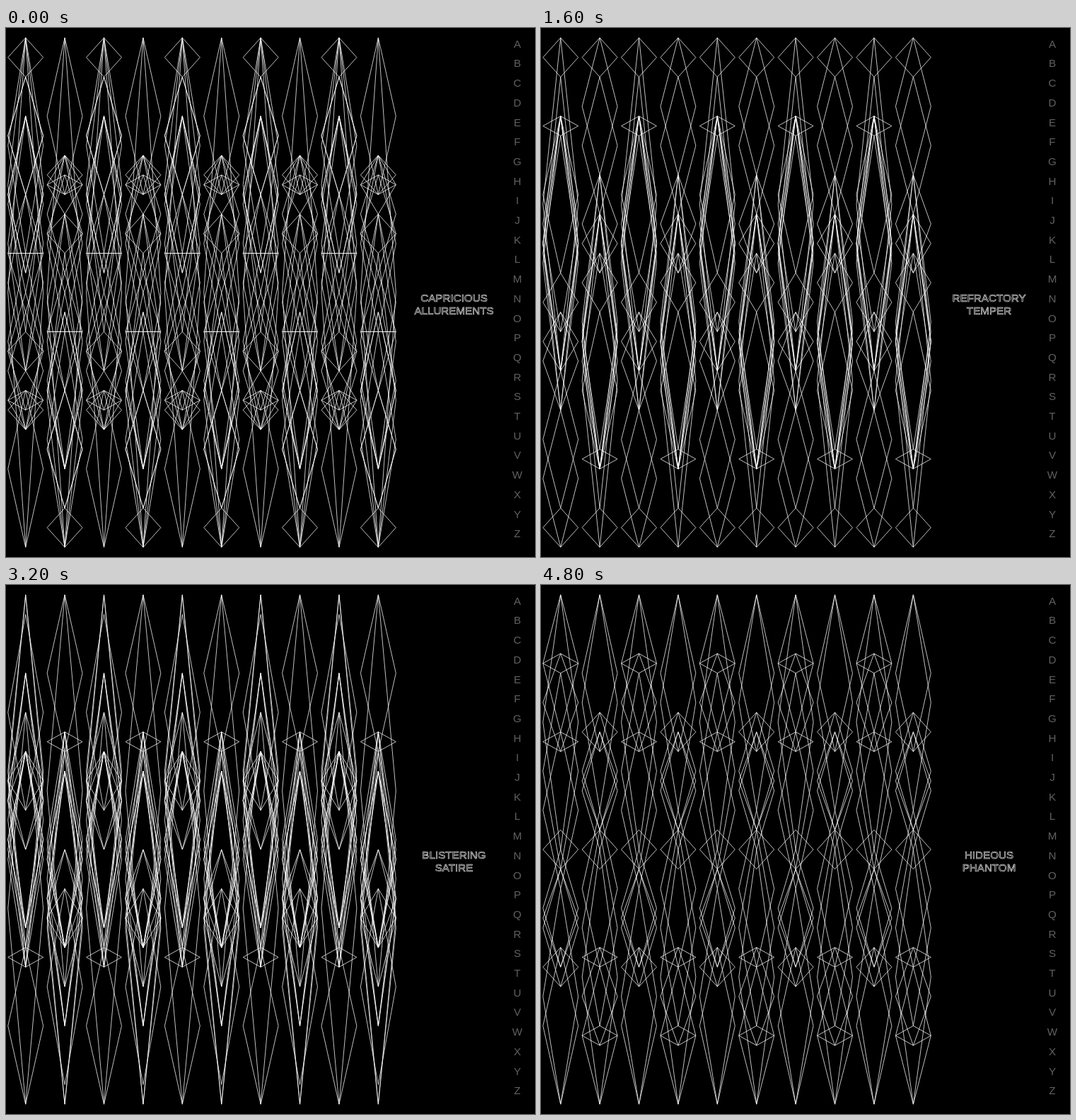
These frames come from a looping animation (748x748 px, 5.6 s). An HTML page with a canvas:

```html
<!DOCTYPE html>
<html lang="en">
<head>
<meta charset="utf-8">
<style>
  html, body { margin: 0; height: 100%; overflow: hidden; background: #000; }
  canvas { display: block; }
</style>
</head>
<body>
<canvas id="stage" width="748" height="748"></canvas>
<script>
const ctx = document.getElementById('stage').getContext('2d');
const PHRASES = [
  'CAPRICIOUS ALLUREMENTS', 'MAIDENLY TIMIDITY', 'REFRACTORY TEMPER',
  'FLUENT SOPHIST', 'BLISTERING SATIRE', 'GREEDY GRASP', 'HIDEOUS PHANTOM'
];
const ALPHABET = 'ABCDEFGHIJKLMNOPQRSTUVWXYZ ';
const HOLD = 800, STEP = 748 / 27, TOP = STEP / 2, HALF = STEP * 0.9, COLUMNS = 10;

// Each pair of neighbouring characters spans a diamond between their rows.
function drawColumn(rows, x, flipped) {
  const y = row => TOP + STEP * (flipped ? 26 - row : row);
  for (let i = 1; i < rows.length; i++) {
    const a = y(rows[i - 1]), b = y(rows[i]), mid = (a + b) / 2;
    ctx.beginPath();
    ctx.moveTo(x, a);
    ctx.lineTo(x + HALF, mid);
    ctx.lineTo(x, b);
    ctx.lineTo(x - HALF, mid);
    ctx.closePath();
    ctx.stroke();
  }
}

function draw(phrase) {
  ctx.fillStyle = '#000';
  ctx.fillRect(0, 0, 748, 748);

  ctx.strokeStyle = '#fff';
  ctx.lineWidth = 0.75;
  const rows = [...phrase].map(c => ALPHABET.indexOf(c));
  for (let i = 0; i < COLUMNS; i++) drawColumn(rows, STEP * (2 * i + 1), i % 2 === 1);

  ctx.font = '15.2px "Liberation Sans", Arial, sans-serif';
  ctx.textAlign = 'center';
  ctx.lineWidth = 0.6;
  phrase.split(' ').forEach((word, i) => ctx.strokeText(word, 633.5, 387 + i * 18.4));

  ctx.fillStyle = '#606060';
  [...ALPHABET].forEach((c, i) => ctx.fillText(c, 723, STEP * (i + 1)));
}

let shown = -1;
function tick() {
  const index = Math.floor(performance.now() / HOLD) % PHRASES.length;
  if (index !== shown) draw(PHRASES[shown = index]);
  requestAnimationFrame(tick);
}
tick();
</script>
</body>
</html>
```
